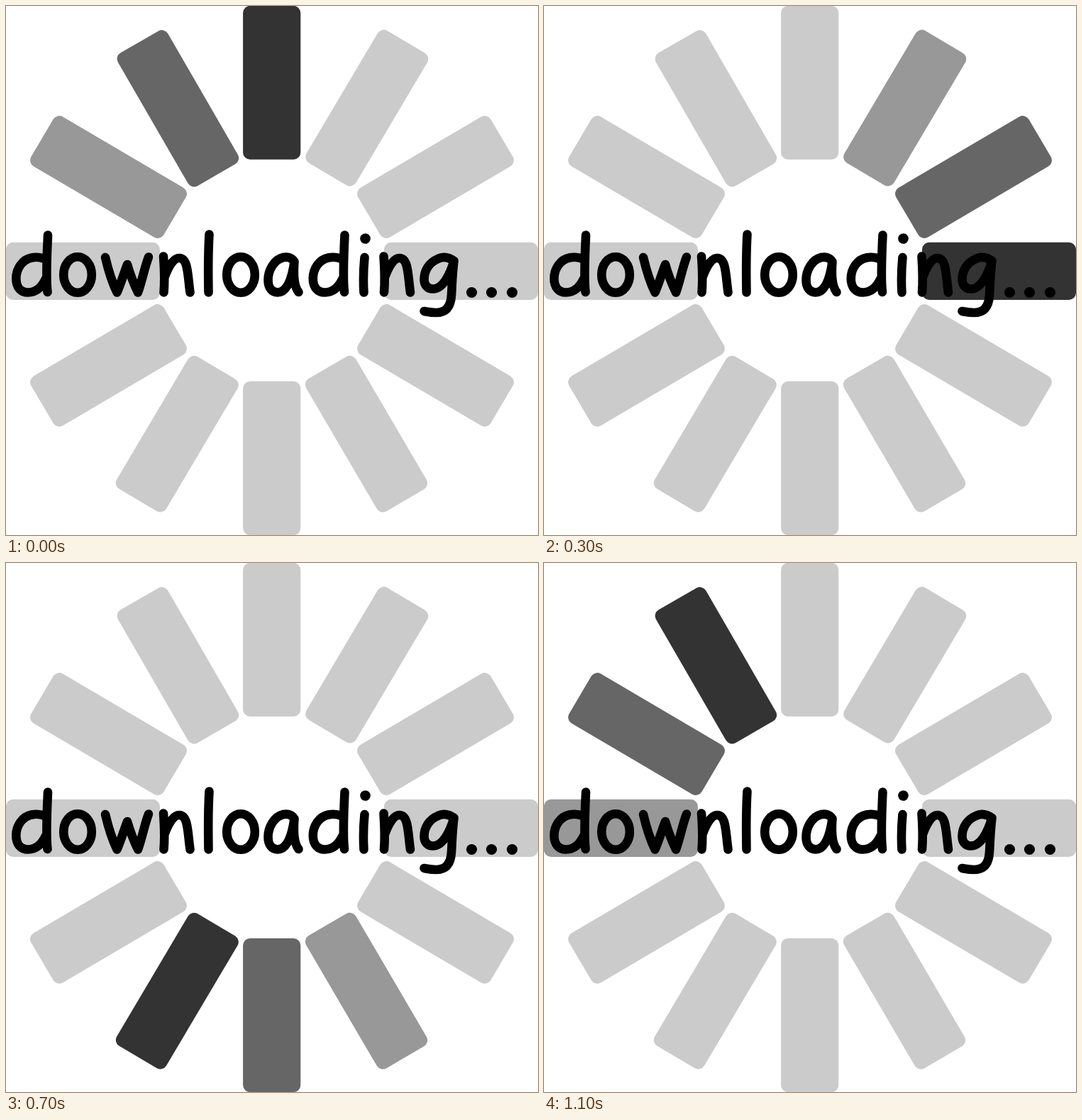
Recreate the animation shown at these times as an HTML page. Size 750 by 747 pixels, loop 1.2 s.

```html
<!DOCTYPE html>
<html lang="en">
<head>
<meta charset="utf-8">
<title>downloading...</title>
<style>
  html, body { margin: 0; width: 100%; height: 100%; overflow: hidden; background: #fff; }
  svg { display: block; width: 100%; height: 100%; }
  .bar { fill: #cbcbcb; animation: fade 1200ms step-end infinite; }
  @keyframes fade {
    0% { fill: #333; }
    8.3333% { fill: #666; }
    16.6667% { fill: #989898; }
    25%, 100% { fill: #cbcbcb; }
  }
  .lettering { fill: none; stroke: #000; stroke-width: 12.6; stroke-linecap: round; stroke-linejoin: round; }
  .dots { fill: #000; stroke: none; }
  .label { fill: none; font: 100px "Open Sans", sans-serif; }
</style>
</head>
<body>
<svg viewBox="0 0 750 747" role="img" aria-label="downloading...">
  <defs>
    <path id="d" d="M59 323.5C58 345 56 385 58.5 404M54 357C47 354 41 354.500 36 355.500C23 358 14.300 371 14.300 385C14.300 397 21 404.500 31 404.500C43 404.500 51 396 56 385"/>
    <ellipse id="o" rx="19.800" ry="25.200"/>
    <path id="n" d="M222 353.500C223 368 224 388 222.500 404.500M223.500 383C229 368 236 356 244 356C257 356 256 380 259.500 404.500"/>
  </defs>
  <g id="wheel"></g>
  <text class="label" x="8" y="410">downloading...</text>
  <g class="lettering">
    <use href="#d"/>
    <use href="#o" x="101" y="379.500"/>
    <path d="M140 355C144 372 149 389 156.500 404.500C162 392 166 378 171 365C175 379 180 392 186 404.500C192 388 195 370 201 354.500"/>
    <use href="#n"/>
    <path d="M286.500 322.500C285 348 285 378 285.500 404.500"/>
    <use href="#o" x="331" y="379.500"/>
    <path d="M405 359C401 354.500 396 354 391 355C378 358 369.500 373 369.500 387C369.500 398 375 404.500 383 404.500C396 404.500 403 386 406.500 361C405 380 406 396 412.500 404"/>
    <use href="#d" x="418.500"/>
    <path d="M505.500 355C504 371 503.500 389 504.500 404.500"/>
    <use href="#n" x="310.500"/>
    <path d="M631.500 360C623 354 615 354 609 357C597 362 589.500 373 589.500 386C589.500 394 594 399.500 602 399.500C616 399.500 626 379 631.500 360C629 380 629 393 628 408C627 426 619 433 606 433C599 433 595 432 589.500 431"/>
  </g>
  <g class="dots">
    <circle cx="506.500" cy="328.500" r="7.300"/>
    <circle cx="656.500" cy="404.500" r="7.600"/>
    <circle cx="684.500" cy="404.500" r="7.600"/>
    <circle cx="713.500" cy="404.500" r="7.600"/>
  </g>
</svg>
<script>
  // Centre x, centre y and tilt of each bar, clockwise from the top
  const bars = [
    [374.7, 108.3, 0], [508.7, 144, 30.6], [605.5, 241.5, 59.5],
    [641.5, 374.4, 90], [605.5, 507.5, -59.5], [508, 604.3, -30.3],
    [374.7, 638.6, 0], [241.3, 604.3, 30.6], [144.5, 507.5, 59.5],
    [108.4, 374.4, 90], [144.5, 241.5, -59.5], [242.4, 144.7, -30]
  ];
  const wheel = document.getElementById("wheel");

  bars.forEach(([x, y, tilt], i) => {
    const bar = document.createElementNS(wheel.namespaceURI, "rect");
    const attrs = {
      class: "bar", x: -40.6, y: -108.5, width: 81.2, height: 217, rx: 10,
      transform: `translate(${x} ${y}) rotate(${tilt})`
    };
    for (const name in attrs) bar.setAttribute(name, attrs[name]);
    bar.style.animationDelay = `${i * 100 - 1200}ms`;
    wheel.append(bar);
  });
</script>
</body>
</html>
```
